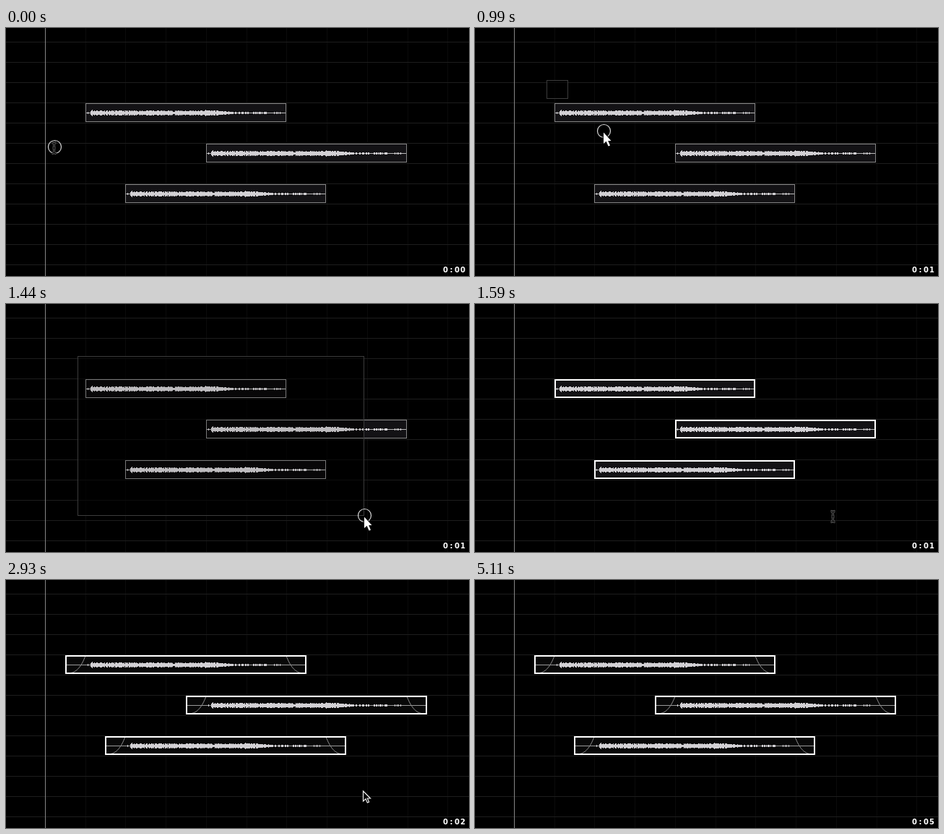
Write an HTML page with a canvas that moves like this. It is 641 by 343 pixels and loops after 5710 ms.

```html
<!DOCTYPE html>
<html>
<head>
<meta charset="utf-8">
<style>
html, body { margin: 0; width: 100%; height: 100%; overflow: hidden; background: #000; }
canvas { display: block; }
</style>
</head>
<body>
<canvas id="stage" width="641" height="343"></canvas>
<script>
const ctx = document.getElementById('stage').getContext('2d');
const W = 641, H = 343, LOOP = 5710;
const CLIP_W = 278, CLIP_H = 26, FADE = 28;
const clips = [[110, 104], [277, 160], [165, 216]];

// start time, cursor kind, x, y, pressed ring
const cursorSteps = [
  [0, 'beam', 67.5, 164.5, true],
  [150, 'beam', 67.5, 164.5],
  [300, 'beam', 73.5, 154.5],
  [450, 'beam', 92.5, 110.5],
  [600, 'beam', 99.5, 72.5],
  [750, 'solid', 98.5, 70.5],
  [890, 'solid', 129.5, 98.5, true],
  [990, 'solid', 178.5, 142.5, true],
  [1140, 'solid', 435.5, 282.5, true],
  [1290, 'solid', 491.5, 291.5, true],
  [1440, 'solid', 496.5, 292.5, true],
  [1590, 'beam', 496.5, 292.5],
  [2480, 'hollow', 496.5, 292.5],
  [3230, 'beam', 496.5, 292.5],
  [4580, 'beam', 505.5, 297.5],
  [4720, 'beam', 537.5, 308.5],
  [4870, 'beam', 591.5, 331.5],
  [5010, 'none', 0, 0]
];

// start time, right and bottom of the selection box
const MARQUEE_X = 99, MARQUEE_Y = 72;
const marqueeSteps = [
  [0], [890, 109, 81], [990, 129, 98], [1140, 400, 256],
  [1290, 487, 290], [1440, 496, 293], [1590]
];
const clockSteps = [[0], [990], [2040], [3080], [3980], [5110]];

const beam = new Path2D('M-3-7.5Q0-7.5 0-5Q0-7.5 3-7.5M0-5V5M-3 7.5Q0 7.5 0 5Q0 7.5 3 7.5M-2 0H2');
const solidArrow = new Path2D('M0 0V15.5L3.6 12.3L6.6 19L9 18L6.2 11.4H10.5Z');
const hollowArrow = new Path2D('M.5 1V15L4 11.8L6.3 17L8.6 16L6.3 11H10.5Z');

const stepIndex = (steps, t) => steps.filter(s => s[0] <= t).length - 1;

function rect(color, x, y, w, h) {
  ctx.fillStyle = color;
  ctx.fillRect(x, y, w, h);
}

function frame(color, x, y, w, h, line) {
  ctx.strokeStyle = color;
  ctx.lineWidth = line;
  ctx.strokeRect(x + line / 2, y + line / 2, w - line, h - line);
}

function makeWave() {
  let seed = 11;
  const random = () => (seed = seed * 16807 % 2147483647) / 2147483647;
  return Array.from({ length: CLIP_W - 2 }, (_, d) => {
    const r = random();
    if (d < 6) return d === 2 ? 1 : 0;
    if (d < 9) return d - 4;
    if (d < 180) return Math.floor(1.9 + r * 2 + (d > 162 && d < 178 ? .5 : 0));
    if (d < 206) return Math.round((206 - d) / 13 + r * .9);
    return r > .62 && d < 270 ? 1 : 0;
  });
}
const wave = makeWave();

function drawGrid() {
  for (let k = 1; k <= 10; k++) rect('#0b0b0b', Math.round(53.9 + 55.75 * k), 0, 1, H);
  for (let y = 19; y < H; y += 28) rect('#1d1d1d', 0, y, W, 1);
  rect('#858585', 54, 0, 1, H);
}

function drawFades(x, y, w) {
  const bottom = y + CLIP_H - 1, top = y + 1, right = x + w;
  ctx.beginPath();
  ctx.moveTo(x, bottom);
  ctx.bezierCurveTo(x + FADE / 3, bottom, x + FADE * 2 / 3, bottom, x + FADE, top);
  ctx.moveTo(right, bottom);
  ctx.bezierCurveTo(right - FADE / 3, bottom, right - FADE * 2 / 3, bottom, right - FADE, top);
  ctx.strokeStyle = '#8c8c8c';
  ctx.lineWidth = 1;
  ctx.stroke();
}

function drawClip([x, y], selected, extended) {
  const pad = extended ? FADE : 0;
  const left = x - pad, width = CLIP_W + pad * 2;
  const mid = y + 13;
  rect(extended ? '#999' : '#bbb', left, mid, width, 1);
  wave.forEach((a, d) => a && rect('#d2d0d4', x + 1 + d, mid - a, 1, a * 2 + 1));
  if (extended) drawFades(left, y, width);
  frame(selected ? '#fff' : '#858585', left, y, width, CLIP_H, selected ? 2 : 1);
}

function drawCursor([, kind, x, y, pressed]) {
  ctx.save();
  ctx.translate(x, y);
  if (pressed) {
    ctx.beginPath();
    ctx.arc(0, 0, 9, 0, Math.PI * 2);
    ctx.strokeStyle = '#d8d8d8';
    ctx.lineWidth = 1.2;
    ctx.stroke();
  }
  if (kind === 'beam') {
    ctx.translate(-1, 1.5);
    for (const [color, line] of [['#686868', 3], ['#000', 1.2]]) {
      ctx.strokeStyle = color;
      ctx.lineWidth = line;
      ctx.stroke(beam);
    }
  } else if (kind === 'solid') {
    ctx.translate(-.5, 2);
    ctx.strokeStyle = '#000';
    ctx.lineWidth = 1.5;
    ctx.stroke(solidArrow);
    ctx.fillStyle = '#fff';
    ctx.fill(solidArrow);
  } else if (kind === 'hollow') {
    ctx.translate(-2.5, -1.5);
    ctx.fillStyle = '#000';
    ctx.fill(hollowArrow);
    ctx.strokeStyle = '#eee';
    ctx.lineWidth = 1.2;
    ctx.stroke(hollowArrow);
  }
  ctx.restore();
}

function drawClock(seconds) {
  ctx.font = 'bold 10px "DejaVu Sans", sans-serif';
  ctx.textAlign = 'center';
  ctx.fillStyle = '#fff';
  [...`0:0${seconds}`].forEach((c, i) => ctx.fillText(c, 608.5 + i * 8, 338));
}

function draw(t) {
  const selected = t >= 1590, extended = t >= 2930;
  const [, right, bottom] = marqueeSteps[stepIndex(marqueeSteps, t)];
  const box = right && [MARQUEE_X, MARQUEE_Y, right - MARQUEE_X, bottom - MARQUEE_Y];
  const pad = extended ? FADE : 0;

  rect('#000', 0, 0, W, H);
  drawGrid();
  for (const [x, y] of clips) {
    rect(extended ? '#080808' : '#131215', x - pad, y, CLIP_W + pad * 2, CLIP_H);
  }
  if (box) rect('rgba(0,0,0,.55)', ...box);
  clips.forEach(clip => drawClip(clip, selected, extended));
  if (box) {
    rect('rgba(0,0,0,.1)', ...box);
    frame('#3c3c3c', box[0], box[1], box[2], box[3], 1);
  }
  drawClock(stepIndex(clockSteps, t));
  drawCursor(cursorSteps[stepIndex(cursorSteps, t)]);
}

function tick() {
  draw(performance.now() % LOOP);
  requestAnimationFrame(tick);
}
tick();
</script>
</body>
</html>
```
